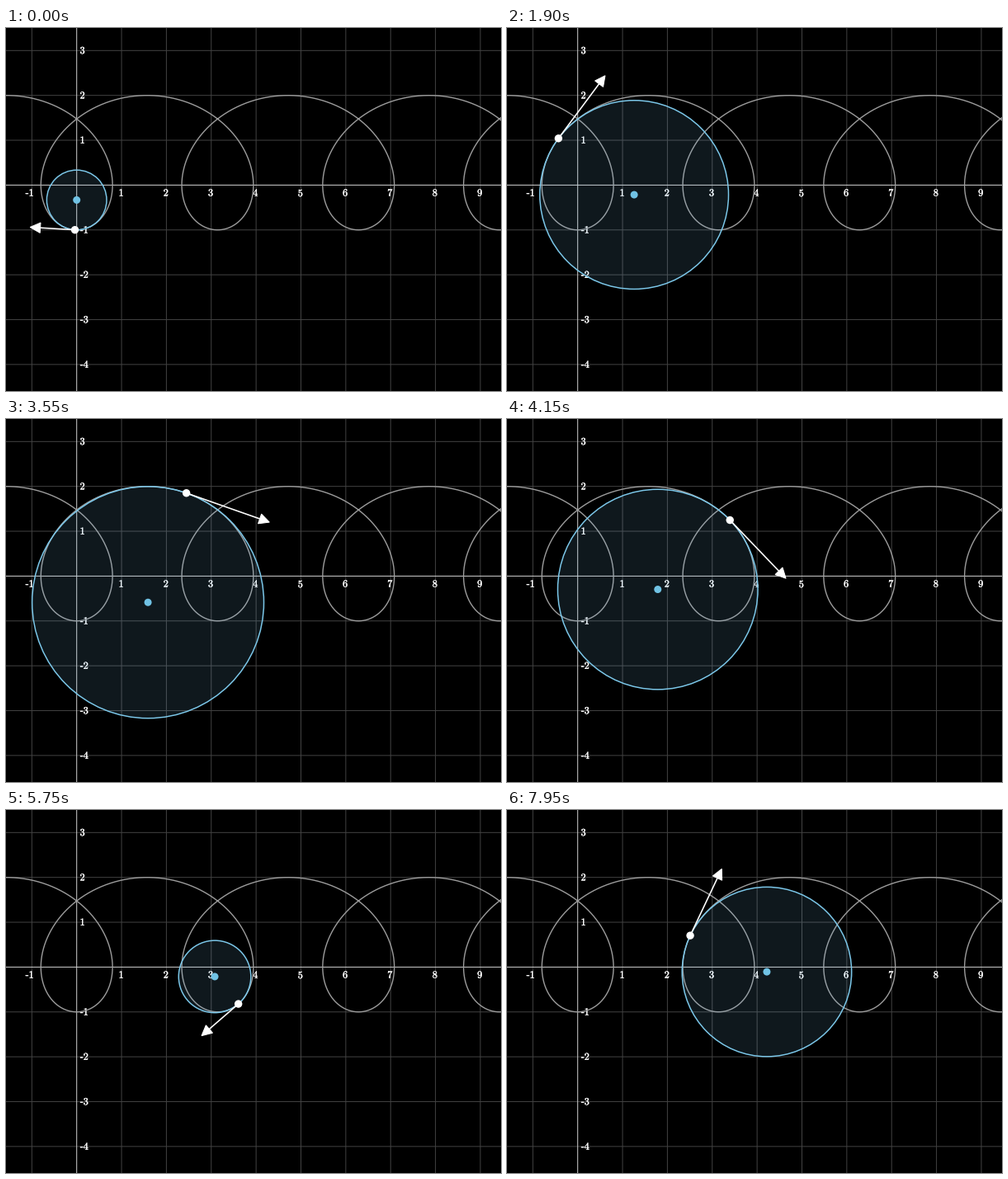
These frames come from a looping animation (600x440 px, 8 s). A matplotlib script:

```python
import numpy as np
import matplotlib.pyplot as plt
from matplotlib import patheffects
from matplotlib.animation import FuncAnimation
from matplotlib.patches import Circle, Polygon

W, H, DPI = 600, 440, 100
UNIT = 54.36            # pixels per axis unit
X0, Y0 = 85.7, 190.4    # origin in pixels from the top left
STEP_MS, FRAMES = 50, 160
T_START = 0.04
PX = 72 / DPI           # one pixel in points

SKY = "#7cc8ea"
GRID = "#424242"
AXIS = "#cfcfcf"
CURVE = "#9c9c9c"

plt.rcParams["mathtext.fontset"] = "cm"
plt.rcParams["font.family"] = "Liberation Serif"


def position(t):
    return np.array([t / 2 - 1.5 * np.sin(t), 0.5 - 1.5 * np.cos(t)])


def velocity(t):
    return np.array([0.5 - 1.5 * np.cos(t), 1.5 * np.sin(t)])


def radius(t):
    """Radius of curvature; the curve always bends to the right."""
    c = np.cos(t)
    return (2.5 - 1.5 * c) ** 1.5 / (2.25 - 0.75 * c)


fig = plt.figure(figsize=(W / DPI, H / DPI), dpi=DPI, facecolor="black")
ax = fig.add_axes([0, 0, 1, 1])
ax.set_xlim(-X0 / UNIT, (W - X0) / UNIT)
ax.set_ylim((Y0 - H) / UNIT, Y0 / UNIT)
ax.axis("off")

thicken = [patheffects.withStroke(linewidth=0.25 * PX, foreground="white")]


def label(n, x, y, align):
    text = f"-${-n}$" if n < 0 else f"${n}$"
    ax.text(x, y, text, color="white", fontsize=12.4 * PX, ha=align,
            va="center", zorder=3, path_effects=thicken)


def grid_line(draw, n):
    color, z = (AXIS, 2) if n == 0 else (GRID, 1)
    draw(n, color=color, lw=PX, zorder=z, snap=False)


for n in range(-1, 10):
    grid_line(ax.axvline, n)
    if n:
        shift = -2.3 / UNIT if n < 0 else 0
        label(n, n + shift, -9.7 / UNIT, "center")
for n in range(-4, 4):
    grid_line(ax.axhline, n)
    if n:
        label(n, 3.8 / UNIT, n - 0.3 / UNIT, "left")

ax.plot(*position(np.linspace(-4 * np.pi, 10 * np.pi, 2400)),
        color=CURVE, lw=1.4 * PX, zorder=4)


def disc(r, color, z):
    return ax.add_patch(Circle((0, 0), r / UNIT, fc=color, lw=0, zorder=z))


circle = ax.add_patch(Circle((0, 0), 1, fc=(0.51, 0.78, 0.95, 0.12), ec=SKY,
                             lw=1.5 * PX, zorder=5))
centre = disc(4.5, "#70c2e4", 6)
shaft, = ax.plot([], [], color="white", lw=1.6 * PX, zorder=7,
                 solid_capstyle="butt", snap=False)
head = ax.add_patch(Polygon(np.zeros((3, 2)), fc="white", ec="white", lw=PX,
                            joinstyle="miter", snap=False, zorder=7))
dot = disc(4.7, "white", 8)


def update(i):
    t = T_START + i * STEP_MS / 1000
    p, v, r = position(t), velocity(t), radius(t)
    along = v / np.hypot(*v)
    right = np.array([along[1], -along[0]])

    circle.center = centre.center = p + r * right
    circle.radius = r
    dot.center = p

    tip = p + v
    base = tip - along * 12.4 / UNIT
    side = right * 6.2 / UNIT
    shaft.set_data(*zip(p, base))
    head.set_xy([tip, base + side, base - side])
    return circle, centre, shaft, head, dot


anim = FuncAnimation(fig, update, frames=FRAMES, interval=STEP_MS,
                     repeat=True, repeat_delay=0, blit=False)
plt.show()
```
